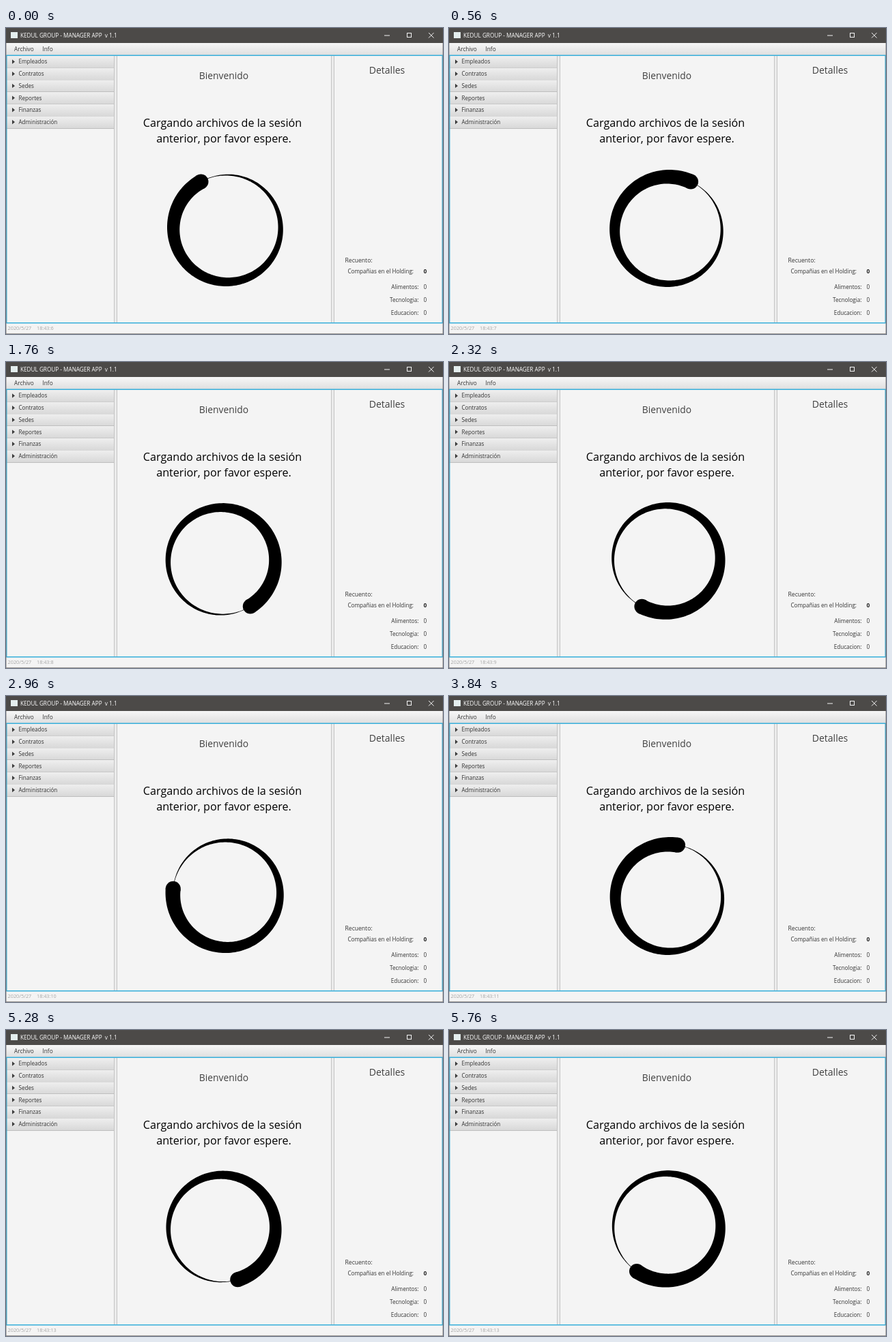
Animation, 640 px wide and 449 px high, one loop 5840 ms. Source, as an HTML page with a canvas:

```html
<!DOCTYPE html>
<html lang="es">
<head>
<meta charset="utf-8">
<title>Manager App</title>
<style>
  html, body { margin: 0; width: 100%; height: 100%; overflow: hidden; background: #f4f4f4; }
  canvas { display: block; }
</style>
</head>
<body>
<canvas id="stage" width="640" height="449"></canvas>
<script>
const ctx = document.getElementById('stage').getContext('2d');
const LOOP = 5840, STEP = 80;
const FONT = '"Open Sans", "Noto Sans", sans-serif';

function text(str, x, y, size, color = '#333', align = 'left', weight = 400) {
  ctx.font = `${weight} ${size}px ${FONT}`;
  ctx.textAlign = align;
  ctx.fillStyle = color;
  ctx.fillText(str, x, y);
}

function rect(x, y, w, h, color) {
  ctx.fillStyle = color;
  ctx.fillRect(x, y, w, h);
}

function shade(x, y, w, h, top, bottom) {
  const g = ctx.createLinearGradient(0, y, 0, y + h);
  g.addColorStop(0, top);
  g.addColorStop(1, bottom);
  rect(x, y, w, h, g);
}

function path(points, close) {
  ctx.beginPath();
  points.forEach(([x, y]) => ctx.lineTo(x, y));
  if (close) ctx.closePath();
}

function titleBar() {
  rect(0, 0, 640, 22, '#4c4a48');
  rect(7, 6, 10, 9, '#e4eeee');
  text('KEDUL GROUP - MANAGER APP \u00a0v 1.1', 21, 14, 8.2, '#fff');
  rect(554, 10.5, 8, 1, '#f4f4f4');
  ctx.strokeStyle = '#f4f4f4';
  ctx.lineWidth = 1;
  ctx.strokeRect(587.5, 7.5, 6, 6);
  path([[619, 7], [626.5, 14.5]]);
  ctx.stroke();
  path([[626.5, 7], [619, 14.5]]);
  ctx.stroke();
}

function menuBar() {
  shade(0, 22, 640, 18, '#f7f7f7', '#dfdfdf');
  text('Archivo', 12, 34, 8.25);
  text('Info', 53.5, 34, 8.25);
}

function divider(x) {
  rect(x, 41, 4.5, 391, '#ebebeb');
  rect(x, 41, 1, 391, '#c4c4c4');
  rect(x + 4, 41, 1, 391, '#c4c4c4');
}

function accordion() {
  const titles = ['Empleados', 'Contratos', 'Sedes', 'Reportes', 'Finanzas', 'Administración'];
  titles.forEach((title, i) => {
    const y = 41 + i * 17.7;
    shade(1, y, 157, 17.7, '#efefef', '#d8d8d8');
    rect(1, Math.round(y + 17), 157, 1, '#bebebe');
    path([[9, y + 5.3], [13, y + 8.5], [9, y + 11.7]], true);
    ctx.fillStyle = '#3c3c3c';
    ctx.fill();
    text(title, 18.5, y + 11.4, 8.1);
  });
}

function details() {
  text('Detalles', 558, 67, 14, '#404040', 'center');
  text('Recuento:', 496.5, 344, 8.6);
  text('Compañias en el Holding:', 597, 359.5, 8.15, '#333', 'right');
  text('0', 611.5, 359.5, 8.3, '#222', 'left', 700);
  ['Alimentos:', 'Tecnologia:', 'Educacion:'].forEach((label, i) => {
    const y = 383 + i * 19.2;
    text(label, 604.5, y, 8.15, '#333', 'right');
    text('0', 611.5, y, 8.15);
  });
}

function welcome() {
  text('Bienvenido', 319, 75, 13.85, '#404040', 'center');
  text('Cargando archivos de la sesión', 317, 145, 16.15, '#000', 'center');
  text('anterior, por favor espere.', 319, 167.5, 16.15, '#000', 'center');
}

function statusBar(t) {
  const second = 6 + Math.floor((t + 560) / 800);
  rect(0, 433, 640, 16, '#f4f4f4');
  text('2020/5/27', 2.5, 443, 7.35, '#a6a6a6');
  text(`18:43:${second}`, 45, 443, 7.25, '#a6a6a6');
}

function headAngle(t) {
  // The turn is slightly slower until it reaches its steady speed.
  return t < 1040 ? 240.9 + t * 0.09625 : 341 + (t - 1040) * 0.1066;
}

// Brush ring: the stroke tapers over a full turn behind a round head.
function spinner(t) {
  const radius = 78.5, width = 22, turn = Math.PI * 2, n = 180;
  const head = headAngle(t) * Math.PI / 180;
  const tilt = head - Math.PI * 1.25;
  const cx = 319.8 + 4 * Math.cos(tilt);
  const cy = 293 + 4 * Math.sin(tilt);
  const at = (a, r) => [cx + r * Math.cos(a), cy + r * Math.sin(a)];
  const outer = [], inner = [];
  for (let i = 0; i <= n; i++) {
    const a = head - turn * i / n;
    const half = Math.max(0.35, width / 2 * (1 - i / n));
    outer.push(at(a, radius + half));
    inner.unshift(at(a, radius - half));
  }
  ctx.fillStyle = '#000';
  path([...outer, ...inner], true);
  ctx.fill();
  ctx.beginPath();
  ctx.arc(...at(head, radius), width / 2, 0, turn);
  ctx.fill();
}

function frame() {
  ctx.strokeStyle = '#36afdb';
  ctx.lineWidth = 1.5;
  ctx.strokeRect(0.75, 40.25, 638.5, 392.5);
  rect(0, 22, 0.5, 427, '#77736f');
  rect(639.5, 22, 0.5, 427, '#77736f');
  rect(0, 448.3, 640, 0.7, '#77736f');
}

function draw(now) {
  const t = Math.floor(now % LOOP / STEP) * STEP;
  rect(0, 0, 640, 449, '#f4f4f4');
  titleBar();
  menuBar();
  accordion();
  divider(158);
  divider(476);
  welcome();
  details();
  statusBar(t);
  frame();
  spinner(t);
}

const start = performance.now();
function tick() {
  draw(performance.now() - start);
  requestAnimationFrame(tick);
}
tick();
</script>
</body>
</html>
```
